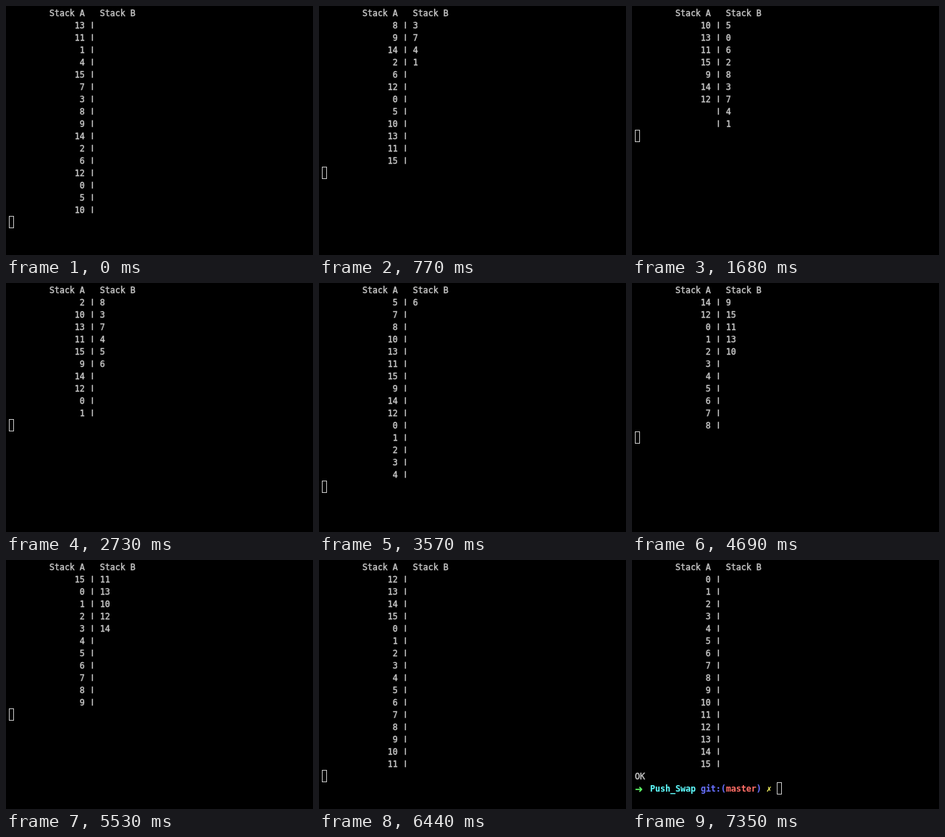
Recreate the animation shown at these times as an HTML page. Size 424x344 px, loop 7980 ms.

```html
<!DOCTYPE html>
<html lang="en">
<head>
<meta charset="utf-8">
<title>Stack sort</title>
<style>
html, body { margin: 0; width: 100%; height: 100%; overflow: hidden; background: #000; }
#term {
  padding: 1px 4px; color: #c7c7c7; white-space: pre;
  font: 11.627px/19px "DejaVu Sans Mono", monospace;
  -webkit-text-stroke: .4px;
}
#term div { height: 17px; }
i, u { display: inline-block; width: 7px; font-style: normal; text-decoration: none; }
i {
  font-size: 9.5px; line-height: 9px; text-align: center; position: relative; top: -2px;
  -webkit-text-stroke: .7px;
}
u { height: 17px; box-sizing: border-box; border: 1px solid #c7c7c7; vertical-align: top; }
b { color: var(--c); -webkit-text-stroke: .1px; }
b.arrow { display: inline-block; width: 7px; height: 17px; font-size: 18px; vertical-align: top; }
</style>
</head>
<body>
<div id="term"></div>
<script>
const TICK = 70, LOOP = 7980;
const CURSOR = '<u></u>';

const a = [13, 11, 1, 4, 15, 7, 3, 8, 9, 14, 2, 6, 12, 0, 5, 10], b = [];
const rotate = s => s.push(s.shift());
const ops = {
  pa: () => a.unshift(b.shift()),
  pb: () => b.unshift(a.shift()),
  ra: () => rotate(a),
  rb: () => rotate(b),
  rr: () => { rotate(a); rotate(b); },
  rrb: () => b.unshift(b.pop())
};

// Operations, and the ticks that pass before each one shows
const program = [
  ['ra ra pb pb ra pb pb pb ra ra pb pb ra pb pb', '122121222121212'],
  ['rb pa ra rrb rrb pa rr rb pa', '121212222'],
  ['ra pa pa ra pa pa ra pa', '21212121'],
  ['ra pa ra ra ra pb pb pb pb pb', '2212121212'],
  ['pb pb rb rb pa ra pa rb rb pa rr pa pa ra pa pa', '2121221212121212'],
  ['ra ra ra ra', '2122']
];

const paint = (color, text, cls = '') => `<b class="${cls}" style="--c:${color}">${text}</b>`;
const prompt = paint('#5ffa68', '➜', 'arrow') + '  ' + paint('#60fdff', 'Push_Swap') + ' ' +
  paint('#6871ff', 'git:(') + paint('#ff6e67', 'master') + paint('#6871ff', ')') + ' ' +
  paint('#fffc67', '✗') + ' ';

function stackRows() {
  const rows = ['        Stack A   Stack B'];
  for (let i = 0; i < Math.max(a.length, b.length); i++)
    rows.push(`${String(a[i] ?? '').padStart(15)} <i>|</i> ${b[i] ?? ''}`);
  return rows;
}

const screens = [];
let tick = 0;
function show(...tail) {
  const html = [...stackRows(), ...tail].map(row => `<div>${row}</div>`).join('');
  screens.push({ at: tick * TICK, html });
}

show(CURSOR);
for (const [names, waits] of program)
  names.split(' ').forEach((name, i) => {
    tick += +waits[i];
    ops[name]();
    show(CURSOR);
  });
tick += 3;
show('OK', CURSOR);
tick += 3;
show('OK', prompt + CURSOR);

const term = document.getElementById('term');
const start = performance.now();
let shown;
function draw() {
  const t = (performance.now() - start) % LOOP;
  const screen = screens.findLast(s => s.at <= t);
  if (screen !== shown) term.innerHTML = (shown = screen).html;
  requestAnimationFrame(draw);
}
draw();
</script>
</body>
</html>
```
